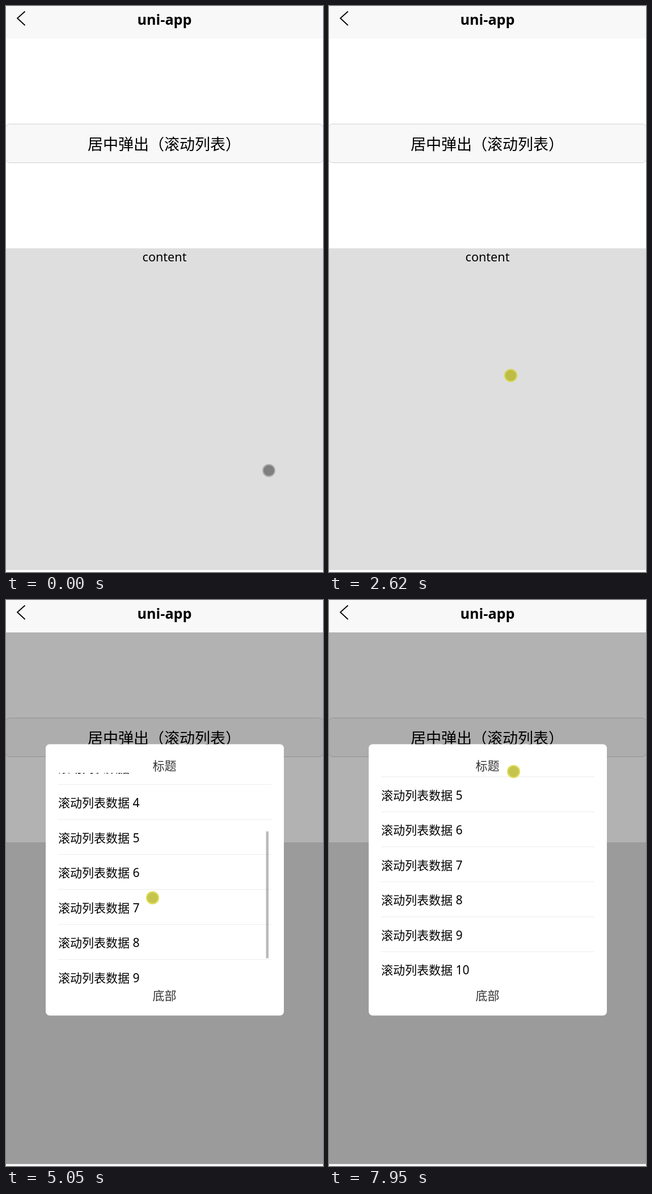
Recreate the animation shown at these times as an HTML page. Size 559 by 995 pixels, loop 8 s.

```html
<!DOCTYPE html>
<html lang="zh-CN">
<head>
<meta charset="utf-8">
<title>uni-app</title>
<style>
html, body { margin: 0; width: 100%; height: 100%; overflow: hidden; background: #fff; }
svg { display: block; width: 559px; height: 995px; }
text { font-family: "Noto Sans", "Noto Sans CJK SC", "Noto Sans CJK", sans-serif; }
.mid { text-anchor: middle; }
.cjk { font-weight: 350; }
.item { font-size: 21px; }
.label { font-size: 21px; fill: #333; }
</style>
</head>
<body>
<svg viewBox="0 0 559 995">
  <defs>
    <clipPath id="pageClip"><rect y="57" width="559" height="934.6"/></clipPath>
    <clipPath id="listClip"><rect x="92" y="304" width="376" height="376"/></clipPath>
  </defs>
  <rect width="559" height="995" fill="#fff"/>
  <g clip-path="url(#pageClip)">
    <g id="page">
      <rect id="button" x="-.5" y="207.5" width="560" height="68" rx="7" fill="#f8f8f8" stroke="#d0d0d0"/>
      <text id="buttonText" class="cjk mid" x="279" y="252.5" font-size="27">居中弹出（滚动列表）</text>
      <rect y="426" width="559" height="1400" fill="#dedede"/>
      <text class="mid" x="279.5" y="449" font-size="21.6">content</text>
    </g>
  </g>
  <rect width="559" height="57" fill="#f8f8f8"/>
  <path d="M33.5 9.5L20 21.5L33.5 34" fill="none" stroke="#000" stroke-width="1.8"/>
  <text class="mid" x="279.5" y="33" font-size="25.2" font-weight="700">uni-app</text>
  <g id="popup" visibility="hidden">
    <rect y="57" width="559" height="934.6" fill="#000" fill-opacity=".3"/>
    <rect x="70" y="253.5" width="420" height="477" rx="7" fill="#fff"/>
    <text class="cjk label mid" x="279.5" y="299">标题</text>
    <g clip-path="url(#listClip)"><g id="list"></g></g>
    <rect id="bar" x="458.5" y="309" width="4.5" height="223" fill="#000" fill-opacity=".27"/>
    <text class="cjk label mid" x="279.5" y="703">底部</text>
  </g>
  <g id="pointer">
    <circle id="ring" cx=".5" cy=".5" r="10.6" fill="none" stroke-width="2"/>
    <circle id="dot" cx=".5" cy=".5" r="9.6"/>
  </g>
</svg>
<script>
const LOOP = 8000, ROW = 61.5, LIST_TOP = 304.5, LIST_MAX = 239, PAGE_MAX = 800;
const FREE = 0, PAGE = 1, LIST = 2, HELD = 3;

// time, x, y, pointer mode until the next step
const steps = [
  [0, 463, 816, FREE], [70, 463, 816, FREE], [350, 320, 576, PAGE],
  [430, 320, 576, PAGE], [860, 320, 360, PAGE], [920, 320, 360, PAGE],
  [1340, 320, 576, PAGE], [1400, 320, 576, PAGE], [1720, 320, 525, PAGE],
  [1790, 320, 525, PAGE], [2090, 320, 360, PAGE], [2560, 320, 649, HELD],
  [2700, 320, 649, FREE], [3180, 281, 254, FREE], [3645, 281, 254, HELD],
  [3815, 281, 254, FREE], [3870, 281, 254, FREE], [4400, 258, 687, LIST],
  [4500, 258, 687, LIST], [5050, 258, 523, LIST], [5170, 258, 523, LIST],
  [5470, 285, 187, LIST], [5550, 288, 179, LIST], [6290, 305, 774, LIST],
  [6400, 305, 809, LIST], [7060, 313, 288, LIST], [7110, 313, 288, FREE],
  [7240, 313, 288, HELD], [7570, 320, 89, HELD], [7930, 325, 301, HELD],
  [LOOP, 325, 301, HELD]
];

const $ = id => document.getElementById(id);
const clamp = (v, lo, hi) => Math.min(hi, Math.max(lo, v));
const ease = k => k * k * (3 - 2 * k);
const setAll = (el, attrs) => { for (const k in attrs) el.setAttribute(k, attrs[k]); };

let rows = "";
for (let i = 0; i < 10; i++) {
  const top = LIST_TOP + i * ROW;
  rows += `<text class="cjk item" x="92" y="${top + 39}">滚动列表数据 ${i + 1}</text>`;
  if (i < 9) rows += `<rect x="92" y="${top + ROW - 1.3}" width="376" height="1.3" fill="#f0f0f0"/>`;
}
$("list").innerHTML = rows;

const drag = (s, mode, dy) => ({
  page: mode === PAGE ? clamp(s.page - dy, 0, PAGE_MAX) : s.page,
  list: mode === LIST ? clamp(s.list - dy, 0, LIST_MAX) : s.list
});

// scroll offsets at the start of each step
const starts = [{ page: 0, list: 0 }];
steps.slice(1).forEach((s, i) =>
  starts.push(drag(starts[i], steps[i][3], s[2] - steps[i][2])));

function draw(t) {
  let i = steps.length - 2;
  while (steps[i][0] > t) i--;
  const [t0, x0, y0, mode] = steps[i], [t1, x1, y1] = steps[i + 1];
  const k = ease((t - t0) / (t1 - t0));
  const x = x0 + (x1 - x0) * k, y = y0 + (y1 - y0) * k;
  // the page settles back to the top while the pointer returns
  const scroll = drag(starts[i], starts[i].page && mode === HELD ? PAGE : mode, y - y0);

  $("page").setAttribute("transform", `translate(0 ${-scroll.page})`);
  $("list").setAttribute("transform", `translate(0 ${-scroll.list})`);
  $("popup").setAttribute("visibility", t >= 3815 ? "visible" : "hidden");
  setAll($("bar"), {
    y: 309 + scroll.list * 142.5 / LIST_MAX,
    opacity: clamp((7230 - t) / 120, 0, 1)
  });

  const pressed = t >= 3815 && t < 3870;
  $("button").setAttribute("fill", pressed ? "#dedede" : "#f8f8f8");
  $("buttonText").setAttribute("fill-opacity", pressed ? .6 : 1);

  $("pointer").setAttribute("transform", `translate(${x} ${y})`);
  $("ring").setAttribute("stroke", mode ? "rgba(214,212,30,.75)" : "rgba(160,160,160,.75)");
  $("dot").setAttribute("fill", mode ? "rgba(177,177,18,.75)" : "rgba(87,87,87,.7)");
}

const begin = performance.now();
function tick() {
  draw((performance.now() - begin) % LOOP);
  requestAnimationFrame(tick);
}
tick();
</script>
</body>
</html>
```
